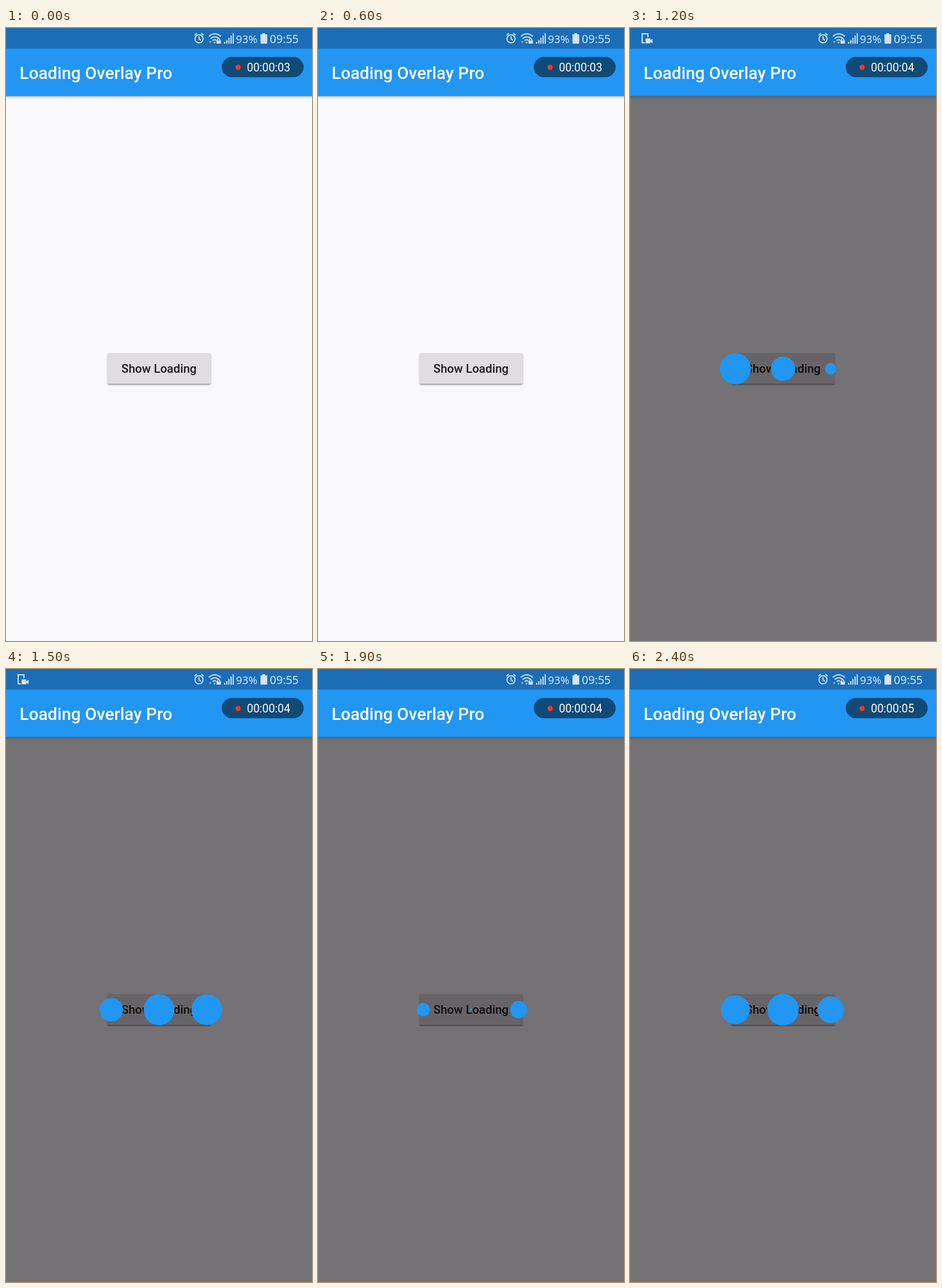
Animation of 529 by 1058 pixels, one loop 2500 ms. Source, as an HTML page:

```html
<!DOCTYPE html>
<html lang="en">
<head>
<meta charset="utf-8">
<title>Loading overlay</title>
<style>
  html, body { margin: 0; height: 100%; overflow: hidden; }
  svg { display: block; width: 100vw; height: 100vh; font-family: Roboto, sans-serif; }
  .status { font-family: "Noto Sans", sans-serif; }
</style>
</head>
<body>
<svg viewBox="0 0 529 1058">
  <defs>
    <linearGradient id="fade" x2="0" y2="1">
      <stop stop-opacity=".3"/>
      <stop offset=".4" stop-opacity=".1"/>
      <stop offset="1" stop-opacity="0"/>
    </linearGradient>
    <filter id="lift" x="-10%" y="-20%" width="120%" height="150%">
      <feDropShadow dx="0" dy="2" stdDeviation="1.3" flood-opacity=".38"/>
    </filter>
    <clipPath id="face"><rect x="175.5" y="561" width="178.5" height="53" rx="3"/></clipPath>
  </defs>

  <rect id="page" width="529" height="1058"/>
  <rect id="button" x="175.5" y="561" width="178.5" height="53" rx="3" filter="url(#lift)"/>
  <circle id="ripple" cx="291" cy="573" r="73" fill="#5b5b5b" clip-path="url(#face)"/>
  <text id="label" x="264.5" y="595" font-size="20.6" font-weight="500" text-anchor="middle">Show Loading</text>
  <g id="dots" fill="#2196f3">
    <circle cx="182" cy="588"/>
    <circle cx="264.5" cy="588"/>
    <circle cx="347" cy="588"/>
  </g>

  <rect y="117" width="529" height="6" fill="url(#fade)"/>
  <rect width="529" height="117.5" fill="#2196f3"/>
  <rect width="529" height="35.5" fill="#1b6eb6"/>
  <text x="23.5" y="87.5" font-size="29.4" font-weight="500" fill="#fff">Loading Overlay Pro</text>

  <rect x="373" y="50" width="141.5" height="35" rx="17.5" fill="#104a77"/>
  <circle cx="401.3" cy="68" r="4.6" fill="#f23a22"/>
  <text id="timer" x="416.5" y="75" font-size="19.4" fill="#fff"></text>

  <g class="status" fill="#d3e3f1" font-size="19.6">
    <text x="397.6" y="25.5" font-size="18.8">93%</text>
    <text x="456" y="25.5">09:55</text>
    <path d="M440 11h3V9h5v2h3.500v16h-11.500z"/>
    <path d="M377 27v-3h2v3zM380.700 27v-6h2v6zM384.400 27v-10h2v10zM388.100 27v-14h2v14zM391.800 27v-18h2v18z"/>
    <g fill="none" stroke="#d3e3f1" stroke-width="1.8">
      <circle cx="333.700" cy="18.700" r="7"/>
      <path d="M333.700 14v5l3.500 2M326 12.500l4-3.500M337.500 9l4 3.500"/>
      <path d="M350.500 14.500q10.500-9 21 0M353.700 18.200q7.300-6 14.600 0M357 21.700q4-3 7 0"/>
      <path d="M365.700 22v-1.500a2 2 0 0 1 4 0v1.500" stroke-width="1.300"/>
    </g>
    <path d="M364 21.500h7.500v5.500h-7.500zM358 24h5l-2.500 3zM351 23h4l-2 2.500z"/>
    <g id="recorder">
      <path d="M26 25.500h-5v-15.500h10v6" fill="none" stroke="#d3e3f1" stroke-width="2"/>
      <path d="M27 18h8v3l4-2.500v8l-4-2.500v2.500h-8z"/>
    </g>
  </g>
</svg>
<script>
  const LOOP = 2500, STEP = 100, SHOW = 900, MAX_RADIUS = 27.5;
  const el = id => document.getElementById(id);
  const toggle = (node, on) => node.setAttribute('visibility', on ? 'visible' : 'hidden');
  const fill = (id, color) => el(id).setAttribute('fill', color);

  function draw(t) {
    const loading = t >= SHOW;
    fill('page', loading ? '#747274' : '#f9f8fa');
    fill('button', loading ? '#676466' : '#dfdde0');
    fill('label', loading ? '#0e0e0e' : '#1c1b1d');
    el('ripple').setAttribute('opacity', loading ? Math.max(0, 1 - (t - SHOW) / 200) : 0);

    toggle(el('dots'), loading);
    // The first moments lag slightly while the overlay opens.
    const lag = 0.07 * Math.max(0, 1 - (t - SHOW) / 200);
    const phase = t / 1000 - 0.763 - lag;
    [...el('dots').children].forEach((dot, i) =>
      dot.setAttribute('r', loading ? MAX_RADIUS * Math.abs(Math.sin(Math.PI * (phase - i * 0.16))) : 0));

    toggle(el('recorder'), loading && t < 1900);
    el('timer').textContent = '00:00:0' + (3 + (t >= 1100) + (t >= 2100));
  }

  function tick() {
    const t = performance.now() % LOOP;
    draw(Math.floor(t / STEP) * STEP);
    requestAnimationFrame(tick);
  }
  tick();
</script>
</body>
</html>
```
